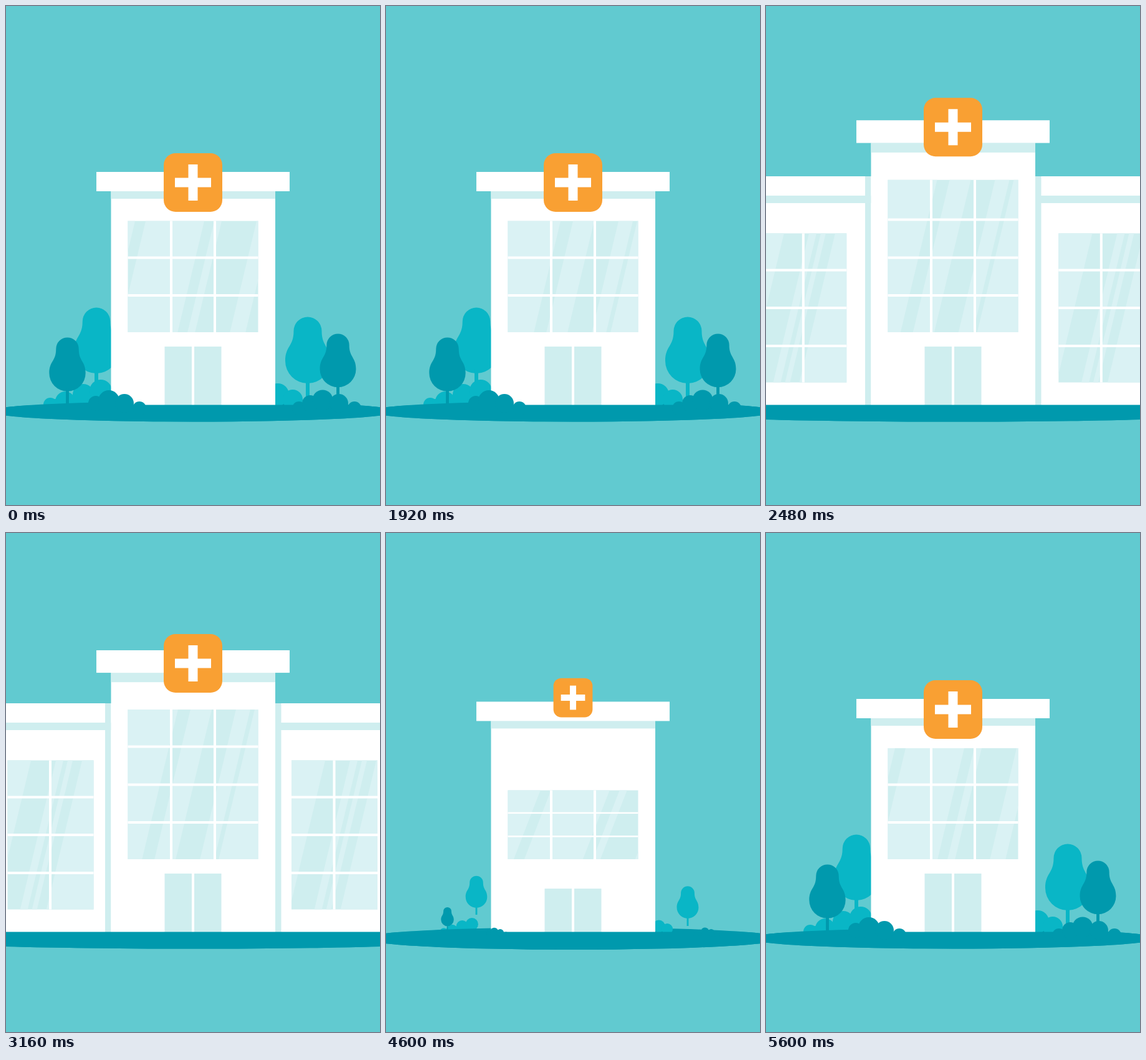
Animation, 600 px wide and 800 px high, one loop 5.68 s. Source, as an HTML page:

```html
<!DOCTYPE html>
<html lang="en">
<head>
<meta charset="utf-8">
<title>Growing hospital</title>
<style>
html, body { margin: 0; width: 100%; height: 100%; overflow: hidden; background: #61cad0; }
svg { display: block; width: 100%; height: 100%; }
</style>
</head>
<body>
<svg id="stage" viewBox="0 0 600 800">
  <defs>
    <clipPath id="aboveGround"><rect x="-100" width="800" height="645"/></clipPath>
    <clipPath id="belowGround"><rect x="-300" y="639.5" width="1200" height="60"/></clipPath>
    <clipPath id="mainGlass"><rect id="mainClip" x="195.5" width="209"/></clipPath>
    <clipPath id="leftGlass"><rect x="2.5" y="364.5" width="138" height="239"/></clipPath>
    <clipPath id="rightGlass"><rect x="458" y="364.5" width="138" height="239"/></clipPath>
  </defs>
</svg>
<script>
const LOOP = 5680, EXPAND = 1920, REBUILD = 4280;
const DARK = '#0099ad', MID = '#09b6c6', SHADE = '#cfeeef', SHINE = '#daf2f4', ORANGE = '#f9a033';
const SLANT = 0.24;
const stage = document.getElementById('stage');

function add(parent, tag, attrs = {}) {
  const el = document.createElementNS('http://www.w3.org/2000/svg', tag);
  set(el, attrs);
  parent.appendChild(el);
  return el;
}
function set(el, attrs) {
  for (const name in attrs) el.setAttribute(name, attrs[name]);
}
const group = (parent, attrs) => add(parent, 'g', attrs);
const rect = (parent, x, y, width, height, fill) => add(parent, 'rect', { x, y, width, height, fill });

// Smooth curve through [time, value, time, value, ...], flat at ends and peaks.
function track(t, keys) {
  const n = keys.length / 2, T = i => keys[2 * i], V = i => keys[2 * i + 1];
  if (t <= T(0)) return V(0);
  if (t >= T(n - 1)) return V(n - 1);
  let i = 0;
  while (t >= T(i + 1)) i++;
  const slope = j => {
    if (j === 0 || j === n - 1 || (V(j) - V(j - 1)) * (V(j + 1) - V(j)) <= 0) return 0;
    return (V(j + 1) - V(j - 1)) / (T(j + 1) - T(j - 1));
  };
  const d = T(i + 1) - T(i), p = (t - T(i)) / d, q = 1 - p;
  return V(i) * (1 + 2 * p) * q * q + slope(i) * d * p * q * q
       + V(i + 1) * p * p * (3 - 2 * p) - slope(i + 1) * d * p * p * q;
}

function shine(parent, bands, ref, top, bottom) {
  const g = group(parent, { fill: SHINE });
  for (const [a, b] of bands) {
    const p = (u, y) => `${u - SLANT * (y - ref)},${y}`;
    add(g, 'polygon', { points: [p(a, top), p(b, top), p(b, bottom), p(a, bottom)].join(' ') });
  }
  return g;
}

// Plants: each slides aside on expansion and pops up on rebuilding.
const plants = [];
function plant(parent, fill, x, base, slide, pop) {
  const el = group(parent, { fill });
  plants.push({ el, x, base, slide, pop });
  return el;
}
function tree(parent, fill, x, top, size, base, slide, pop) {
  const g = plant(parent, fill, x, base, slide, pop);
  add(g, 'path', {
    d: 'M-22.5 23A22.5 22.5 0 0 1 22.5 23C22.5 48 36 47 36 71A36 36 0 0 1-36 71C-36 47-22.5 48-22.5 23Z',
    transform: `translate(${x} ${top}) scale(${size})`
  });
  rect(g, x - 3 * size, top + 100 * size, 6 * size, base - top - 100 * size);
}
function bush(parent, fill, x, base, slide, pop, blobs) {
  const g = plant(parent, fill, x, base, slide, pop);
  for (const [cx, cy, r] of blobs) add(g, 'circle', { cx, cy, r });
  return g;
}

// Layers, back to front
const back = group(stage);
const ground = add(stage, 'ellipse', { cx: 300, cy: 650, fill: DARK });
const backRight = group(stage, { 'clip-path': 'url(#aboveGround)' });
const building = group(stage, { 'clip-path': 'url(#aboveGround)' });
const floor = add(group(stage, { 'clip-path': 'url(#belowGround)' }), 'ellipse', { cx: 300, cy: 650, fill: DARK });
const front = group(stage);

tree(back, MID, 145, 483, 0.99, 612, [-102, -250], [4520, 1.14, 1.1]);
tree(back, MID, 484, 498, 1, 630, [90, 215], [4520, 1.14, 1.11]);
const leftHedge = bush(back, MID, 120, 640, [-87, -235], [4500, 1.1, 1.05],
  [[71, 639, 11], [95, 634, 16], [124, 623, 17], [152, 617, 18]]);
rect(leftHedge, 75, 630, 95, 14);
bush(backRight, MID, 440, 640, [80, 205], [4500, 1.1, 1.06], [[436, 623, 18], [460, 631, 16]]);

tree(front, DARK, 98.5, 531, 0.81, 637, [-83.5, -210], [4540, 1.08, 1.045]);
tree(front, DARK, 532.5, 525, 0.805, 635, [79, 205], [4640, 1.1, 0.88]);
bush(front, DARK, 179, 643, [-95, -260], [4540, 1.18, 1.13],
  [[144, 637, 12], [165, 633, 17], [190, 637, 15], [214, 645, 11]]);
bush(front, DARK, 514, 643, [67, 210], [4540, 1.18, 1.14],
  [[470, 645, 11], [488, 637, 13], [508, 632, 16.5], [534, 637, 15], [559, 645, 11]]);

// Side wings
function wing(side, roofX, wallX, glassX, shineX, shadowX) {
  const g = group(building);
  rect(g, wallX, 300, 212, 350, '#fff');
  rect(g, wallX, 304, 212, 12, SHADE);
  rect(g, roofX, 273, 235, 31, '#fff');
  const glass = group(g, { 'clip-path': `url(#${side}Glass)` });
  rect(glass, glassX, 364, 139, 240, SHADE);
  shine(glass, [[-60, 40], [80, 92], [99, 107], [122, 260]].map(b => b.map(u => u + shineX)), 365, 360, 606);
  const shadow = rect(glass, shadowX, 360, 35, 250, SHADE);
  for (const y of [423.5, 484, 545]) rect(glass, glassX, y - 2, 139, 4, '#fff');
  rect(glass, glassX + 67, 360, 4, 250, '#fff');
  return { g, shadow };
}
const left = wing('left', -48, -25, 2, 0, 139);
const right = wing('right', 411, 410.5, 457.5, 472, 432);
const strips = [159, 432].map(x => rect(building, x, 273, 9.5, 370, SHADE));

// Main block
const units = group(building, { fill: '#8ad9dd' });
for (const [x, w] of [[225, 35], [335, 34], [390, 36]]) rect(units, x, 0, w, 18);
const wall = rect(building, 168.5, 0, 263.5, 0, '#fff');
const eave = rect(building, 168.5, 0, 263.5, 0, SHADE);
const roof = rect(building, 145, 0, 310, 0, '#fff');

const windows = group(building);
const glass = group(windows, { 'clip-path': 'url(#mainGlass)' });
rect(glass, 195, 260, 210, 264, SHADE);
const shineA = shine(glass, [[100, 207], [224, 318], [334, 346], [402, 427]], 345, 260, 525);
const shineB = shine(glass, [[100, 280], [300, 334], [373, 396], [403, 470]], 345, 260, 525);
for (const y of [342.5, 403.5, 464]) rect(glass, 195, y - 2, 210, 4, '#fff');
for (const x of [265, 335]) rect(glass, x - 2, 260, 4, 264, '#fff');
const mainClip = document.getElementById('mainClip');

const door = group(building);
rect(door, 254.5, 546, 43.5, 94, SHADE);
rect(door, 302, 546, 43.5, 94, SHADE);

const sign = group(building);
add(sign, 'rect', { x: -47, y: -47, width: 94, height: 94, rx: 19, fill: ORANGE });
rect(sign, -29, -7.5, 58, 15, '#fff');
rect(sign, -7.5, -29, 15, 58, '#fff');

function draw(t) {
  const rebuilt = t >= REBUILD;
  const spread = (rest, half, peak, end) => track(t, [EXPAND, rest, 2200, half, 2520, peak, 2760, end]);
  const pop = (start, peak, mid) => track(t, peak > mid && mid >= 1
    ? [start, 0, 4700, peak, 4800, mid, 5240, 1]
    : [start, 0, 4800, mid, 4920, peak, 5240, 1]);
  const stretch = (el, base, s) => set(el, { transform: `translate(0 ${base}) scale(1 ${s}) translate(0 ${-base})` });

  const rx = rebuilt ? track(t, [4280, 0, 4560, 340, 4760, 329]) : spread(329, 420, 495, 489);
  const ry = rebuilt ? track(t, [4280, 0, 4520, 18.5, 4760, 16.5]) : 16.5;
  for (const el of [ground, floor]) set(el, { rx, ry });

  for (const p of plants) {
    const s = rebuilt ? pop(...p.pop) : 1;
    const dx = rebuilt ? 0 : track(t, [EXPAND, 0, 2200, p.slide[0], 2560, p.slide[1]]);
    set(p.el, { transform: `translate(${p.x + dx} ${p.base}) scale(${s}) translate(${-p.x} ${-p.base})` });
  }

  const wings = t > EXPAND && !rebuilt ? 'inline' : 'none';
  for (const el of [left.g, right.g, ...strips]) set(el, { display: wings });
  const leftX = spread(230, 96, -14, 0), rightX = spread(-230, -92.5, 14, 0);
  set(left.g, { transform: `translate(${leftX} 0)` });
  set(right.g, { transform: `translate(${rightX} 0)` });
  set(left.shadow, { x: 139 - leftX + (leftX < 96 ? (96 - leftX) * 0.21 : 0) });
  set(right.shadow, { x: 432 - rightX, width: track(t, [2200, 35, 2500, 9.5]) });
  for (const el of strips) set(el, { opacity: track(t, [2220, 0, 2480, 1]) });

  const top = rebuilt
    ? track(t, [4360, 650, 4680, 202, 4800, 233, 4920, 253, 5240, 266])
    : spread(266, 226, 182, 188);
  const lift = Math.max(0, 266 - top);
  const roofH = 31 + lift * 0.065, eaveY = top + roofH;
  set(roof, { y: top, height: roofH });
  set(eave, { y: eaveY, height: 12 + lift * 0.04 });
  set(wall, { y: eaveY, height: Math.max(0, 650 - eaveY) });
  set(units, {
    display: rebuilt ? 'inline' : 'none',
    transform: `translate(0 ${top + track(t, [4600, 10, 4720, -10, 4800, -5, 4900, 6])})`
  });

  const clipTop = rebuilt ? 345 : spread(344.5, 310, 278, 283);
  set(mainClip, { y: clipTop, height: 523 - clipTop });
  const alt = t >= EXPAND && !rebuilt;
  set(shineA, {
    display: alt ? 'none' : 'inline',
    transform: `translate(${rebuilt ? track(t, [4480, 50, 4800, 15, 5240, 0]) : 0} 0)`
  });
  set(shineB, { display: alt ? 'inline' : 'none', transform: `translate(${spread(0, -4, -22, -19)} 0)` });
  stretch(windows, 523, rebuilt ? pop(4480, 1.08, 1.04) : 1);
  stretch(door, 640, rebuilt ? pop(4460, 1.18, 1.1) : 1);

  const signY = rebuilt
    ? track(t, [4440, 420, 4680, 211, 4800, 244, 4920, 266, 5240, 283])
    : spread(283, 239, 193, 209);
  set(sign, { transform: `translate(300 ${signY}) scale(${rebuilt ? pop(4460, 1.06, 1.04) : 1})` });
}

function frame() {
  draw(performance.now() % LOOP);
  requestAnimationFrame(frame);
}
frame();
</script>
</body>
</html>
```
